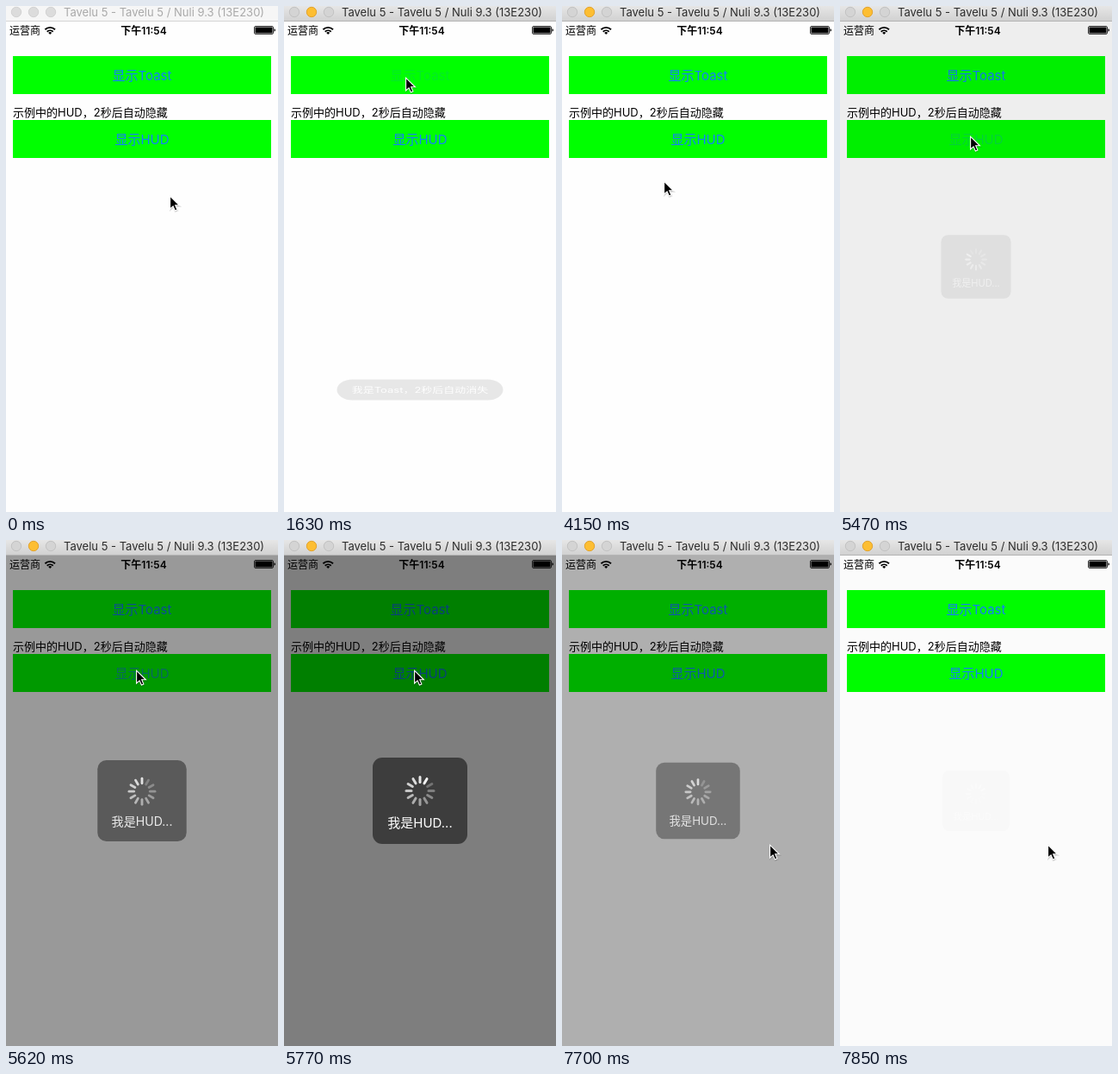
Write an HTML page that moves like this. It is 316 by 586 pixels and loops after 7990 ms.

```html
<!DOCTYPE html>
<html lang="zh">
<head>
<meta charset="utf-8">
<style>
  html, body { margin: 0; width: 100%; height: 100%; overflow: hidden; background: #fefefe; }
  svg { display: block; width: 316px; height: 586px; }
  text { font: 13px Inter, "Noto Sans CJK SC", "Noto Sans CJK", sans-serif; }
  .mid { text-anchor: middle; }
  .button { font-size: 15px; fill: #147efb; }
  .status { font-size: 12px; }
  #title { fill: #a9a9a9; }
  .light { fill: #dcdcdc; stroke: #d2d2d2; }
  .active #title { fill: #2c2c2c; }
  .active #bar { fill: url(#chrome); }
  .active #edge { fill: #b4b4b4; }
  .active .light { fill: #d4d4d4; stroke: #c2c2c2; }
  .active .light.yellow { fill: #fdbe32; stroke: #e2a32c; }
</style>
</head>
<body>
<svg id="stage" viewBox="0 0 316 586">
  <defs>
    <linearGradient id="chrome" x2="0" y2="1">
      <stop stop-color="#e6e6e6"/><stop offset="1" stop-color="#d0d0d0"/>
    </linearGradient>
  </defs>
  <rect width="316" height="586" fill="#fefefe"/>

  <g id="window">
    <rect id="bar" width="316" height="18" fill="#f6f6f6"/>
    <rect id="edge" y="17" width="316" height="1" fill="#d4d4d4"/>
    <circle class="light" cx="12" cy="7" r="5.7"/>
    <circle class="light yellow" cx="32" cy="7" r="5.7"/>
    <circle class="light" cx="52" cy="7" r="5.7"/>
    <text id="title" x="67" y="12">Tavelu 5 - Tavelu 5 / Nuli 9.3 (13E230)</text>
  </g>

  <g id="status">
    <text class="status" x="4" y="32.5">运营商</text>
    <g fill="none" stroke="#000" stroke-width="1.9">
      <path d="M45.4 27.2a8.4 8.4 0 0 1 11.6 0M47.7 29.7a5.2 5.2 0 0 1 7 0"/>
      <path d="M51.2 33l-2-2.1a2.9 2.9 0 0 1 4 0z" fill="#000" stroke="none"/>
    </g>
    <text class="status mid" x="160" y="32.5" font-weight="600" style="font-weight:600">下午11:54</text>
    <rect x="288.5" y="23.5" width="22" height="9" rx="1.5" fill="none" stroke="#000" stroke-width=".8"/>
    <rect x="289.5" y="24.5" width="20" height="7" rx=".6"/>
    <path d="M311.5 26.3q1.5 .3 1.5 1.7t-1.5 1.7z"/>
  </g>

  <rect x="8" y="58" width="300" height="44" fill="#0f0"/>
  <text id="toastLabel" class="button mid" x="158" y="85.5">显示Toast</text>
  <text x="8" y="127.5">示例中的HUD，2秒后自动隐藏</text>
  <rect x="8" y="132" width="300" height="44" fill="#0f0"/>
  <text id="hudLabel" class="button mid" x="158" y="159.5">显示HUD</text>

  <g id="toast">
    <rect x="-96.5" y="-18" width="193" height="36" rx="18" fill="#4c4c4c"/>
    <text class="mid" y="4.7" fill="#fff">我是Toast，2秒后自动消失</text>
  </g>

  <rect id="dim" y="18" width="316" height="568"/>
  <g id="hud">
    <rect x="-55" y="-50" width="110" height="100" rx="11" fill-opacity=".515"/>
    <g id="spinner" transform="translate(0 -11.5)" stroke="#fff" stroke-width="3" stroke-linecap="round"></g>
    <text class="mid" y="31" fill="#fff" style="font-size:15px">我是HUD...</text>
  </g>

  <g id="cursor">
    <path d="M1 2.5V17l3.4-3 2.3 5 2.6-1.1L7.1 13h4.6z" fill-opacity=".18" stroke="#000" stroke-opacity=".1" stroke-width="2"/>
    <path d="M.6 1.2V16l3.5-3.2 2.3 5.2 2.5-1.1-2.2-5.1h4.7z" stroke="#fff" stroke-width="1.1"/>
  </g>
</svg>

<script>
const LOOP = 7990, TICK = 148, LAST_TICK = 53, FADE = 300;
const el = id => document.getElementById(id);

// Tracks are [tick, ...values], linear between entries.
const cursorTrack = [
  [0, 190, 219], [1, 191, 202], [2, 190, 188], [3, 190, 188], [4, 172, 160],
  [5, 146, 120], [6, 146, 120], [7, 143, 98], [8, 141, 82], [14, 141, 82],
  [15, 136, 108], [16, 126, 160], [17, 119, 192], [18, 118, 202], [28, 118, 202],
  [30, 130, 184], [32, 148, 157], [33, 151, 150], [48, 151, 150],
  [50, 166, 200], [51, 241, 352]
];
const toastPress = [[9, 1], [10, .15], [11, .15], [12, .5], [13, .85], [14, 1]];
const hudPress = [[35, 1], [36, .2], [37, .24], [38, .65], [39, 1]];

function sample(track, tick) {
  const i = track.findIndex(key => key[0] > tick);
  if (i === 0) return track[0].slice(1);
  if (i < 0) return track[track.length - 1].slice(1);
  const [a, b] = [track[i - 1], track[i]];
  const u = (tick - a[0]) / (b[0] - a[0]);
  return a.slice(1).map((v, k) => v + (b[k + 1] - v) * u);
}

function ease(time, start) {
  const u = Math.min(1, Math.max(0, (time - start) / FADE));
  return u * u * (3 - 2 * u);
}

const spokes = Array.from({ length: 12 }, (_, i) => {
  const line = document.createElementNS("http://www.w3.org/2000/svg", "line");
  line.setAttribute("y1", -10);
  line.setAttribute("y2", -16);
  line.setAttribute("transform", `rotate(${i * 30})`);
  return el("spinner").appendChild(line);
});

function place(id, transform, opacity = 1) {
  el(id).setAttribute("transform", transform);
  el(id).setAttribute("opacity", opacity);
}

function draw(tick) {
  const time = tick * TICK;
  el("window").classList.toggle("active", tick >= 8);
  el("toastLabel").setAttribute("opacity", sample(toastPress, tick)[0]);
  el("hudLabel").setAttribute("opacity", sample(hudPress, tick)[0]);

  // The toast drops in from above and leaves downwards, flattened at both ends.
  const toastIn = ease(time, 1562), toastOut = ease(time, 3790);
  const toastShown = toastIn - toastOut;
  const toastY = 462 - 20 * (1 - toastIn) + 20 * toastOut;
  place("toast", `translate(158 ${toastY}) scale(1 ${.62 + .38 * toastShown})`, toastShown);

  const hudShown = ease(time, 5410) - ease(time, 7571);
  el("dim").setAttribute("opacity", .5 * hudShown);
  place("hud", `translate(158 302) scale(${.7 + .3 * hudShown})`, hudShown);

  const lead = Math.floor(time * 12 / 1000 + 4.6);
  spokes.forEach((line, i) => {
    const behind = ((lead - i) % 12 + 12) % 12;
    line.setAttribute("stroke-opacity", .94 - behind * .06);
  });

  const [x, y] = sample(cursorTrack, tick);
  place("cursor", `translate(${x} ${y})`);
}

const began = performance.now();
function frame(now) {
  const time = Math.max(0, now - began) % LOOP;
  draw(Math.min(LAST_TICK, Math.floor((time + 8) / TICK)));
  requestAnimationFrame(frame);
}
draw(0);
requestAnimationFrame(frame);
</script>
</body>
</html>
```
